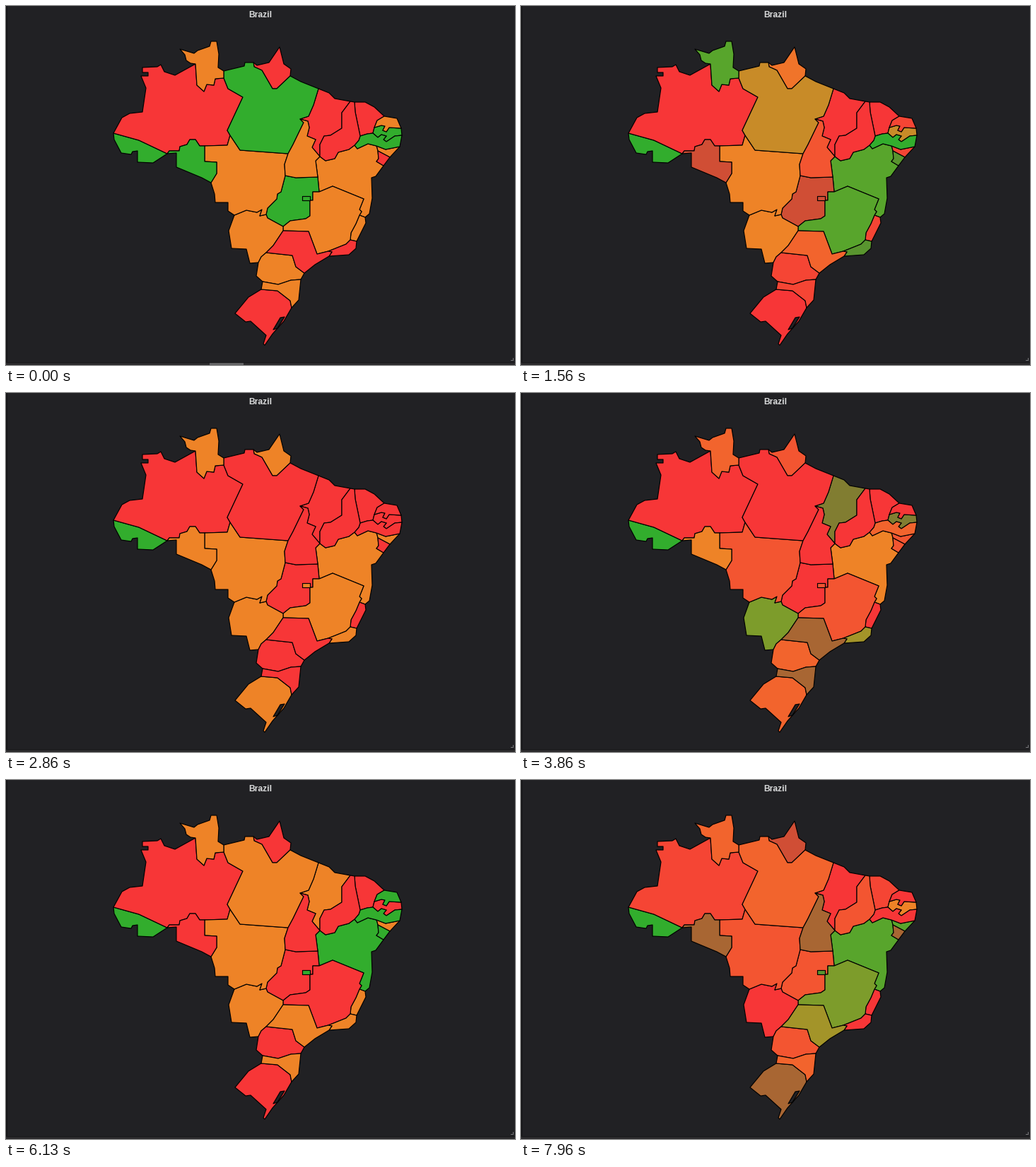
Recreate the animation shown at these times as a matplotlib script. Size 720 by 508 pixels, loop 8 s.

```python
import numpy as np
import matplotlib.pyplot as plt
from matplotlib.animation import FuncAnimation
from matplotlib.patches import Polygon, Rectangle

WIDTH, HEIGHT, DPI = 720, 508, 100
INTERVAL, LOOP = 20, 8000
BACKGROUND = "#212124"
RGB = {key: np.array(value) / 255 for key, value in
       dict(R=(247, 54, 55), O=(238, 131, 39), G=(50, 173, 45)).items()}
STEPS = 5  # colour steps per data refresh
HOVER_END = 560

# Each refresh recolours at a steady rate with one stall: start, pause, resume, end (ms)
REFRESHES = [
    (951, 1360, 1460, 1700), (2033, 2260, 2460, 2860), (3325, 3500, 3730, 4130),
    (4850, 5030, 5260, 5530), (6192, 6260, 6500, 6860), (7432, 7600, 7800, 8130),
]

# Colour of each state after every refresh; states repaint in this order
LEVELS = dict(
    AC="GGGGGGG", AL="OROROOG", AM="RRRRROR", AP="ROORRGR", BA="OGOOGOG", CE="RRRRROR",
    DF="GRORGRG", ES="ORRRORR", GO="GRRRROR", MA="RRRGORR", MG="OGORROG", MS="OOOGORR",
    MT="OOOROOR", PA="GORRORO", PB="GORGROO", PE="GGROGRR", PI="RRRRROR", PR="ORROROR",
    RJ="RGOGORR", RN="ORRRGRR", RO="GROORGR", RR="OGORORO", RS="RRORRGR", SC="ORRGORO",
    SE="RGROGGR", SP="RORGOGO", TO="ORRRRGR")

borders = []


def border(owners, *coords):
    """A line shared by two states, or the outer edge of one."""
    borders.append((owners.split(), list(zip(coords[::2], coords[1::2]))))


def outline(name):
    """Join all borders of a state end to end."""
    pieces = [points for owners, points in borders if name in owners]
    loop = list(pieces.pop(0))
    while pieces:
        piece = next(p for p in pieces if loop[-1] in (p[0], p[-1]))
        pieces.remove(piece)
        loop += piece[1:] if piece[0] == loop[-1] else piece[-2::-1]
    return loop


# North
border("AC", 152, 180, 153, 189, 163, 208, 177, 210, 179, 206, 186, 205, 186, 221,
       208, 222, 228, 209)
border("AC AM", 152, 180, 188, 190, 228, 209)
border("AM", 152, 180, 164, 158, 175, 152, 193, 150, 198, 116, 191, 99, 201, 99,
       201, 94, 193, 94, 193, 87, 214, 86, 219, 83, 224, 93, 239, 98, 268, 82)
border("AM RO", 228, 209, 231, 205, 245, 205, 246, 199, 256, 196, 260, 189, 268, 189,
       274, 198, 281, 198)
border("AM MT", 281, 198, 313, 197, 317, 183)
border("AM PA", 317, 183, 313, 176, 335, 129, 314, 117, 308, 102)
border("AM RR", 268, 82, 270, 112, 280, 121, 284, 111, 294, 112, 296, 103, 308, 102)
border("RR", 268, 82, 261, 81, 255, 77, 253, 69, 246, 61, 266, 67, 271, 63, 288, 57,
       290, 50, 298, 50, 301, 68, 300, 87, 308, 92)
border("RR PA", 308, 92, 308, 102)
border("PA", 308, 92, 337, 85, 338, 80, 350, 80)
border("AP PA", 350, 80, 351, 86, 362, 91, 377, 117, 383, 117, 402, 99)
border("AP", 350, 80, 355, 84, 372, 80, 387, 58, 393, 82, 403, 89, 402, 99)
border("PA", 402, 99, 417, 107, 442, 117)
border("PA MA", 442, 117, 435, 140, 428, 156, 416, 160)
border("PA TO", 416, 160, 421, 165, 406, 196, 399, 209)
border("PA MT", 399, 209, 331, 204, 317, 183)
border("RO", 228, 209, 241, 208, 241, 228, 277, 243, 290, 250)
border("RO MT", 281, 198, 281, 220, 298, 221, 298, 237, 290, 250)
border("MA TO", 416, 160, 427, 163, 429, 172, 426, 184, 438, 189, 433, 200, 444, 213)

# Northeast
border("MA", 442, 117, 457, 123, 465, 131, 487, 135)
border("MA PI", 487, 135, 478, 147, 475, 151, 475, 173, 459, 183, 450, 184, 444, 196,
       444, 213)
border("PI", 487, 135, 493, 136)
border("CE PI", 493, 136, 494, 150, 501, 184)
border("PE PI", 501, 184, 499, 190, 493, 197)
border("PI BA", 493, 197, 485, 203, 470, 207, 465, 216, 452, 219, 444, 213)
border("CE", 493, 136, 508, 136, 521, 143, 535, 156)
border("CE RN", 535, 156, 525, 162, 521, 172)
border("CE PB", 521, 172, 519, 180)
border("CE PE", 519, 180, 511, 181, 501, 184)
border("RN", 535, 156, 553, 159, 559, 173)
border("RN PB", 521, 172, 531, 169, 536, 170, 533, 176, 538, 178, 542, 172, 559, 173)
border("PB", 559, 173, 560, 183)
border("PB PE", 519, 180, 526, 186, 531, 182, 538, 184, 534, 189, 538, 192, 550, 184,
       560, 183)
border("PE", 560, 183, 557, 199)
border("PE AL", 524, 198, 537, 203, 557, 199)
border("PE BA", 493, 197, 497, 202, 512, 195, 524, 198)
border("AL", 557, 199, 543, 214)
border("AL SE", 526, 205, 543, 214)
border("AL BA", 524, 198, 526, 205)
border("SE", 543, 214, 534, 226)
border("SE BA", 526, 205, 527, 216, 524, 220, 534, 226)

# Centre
border("BA", 534, 226, 523, 241, 517, 243, 518, 272, 514, 294, 508, 299)
border("BA TO", 444, 213, 438, 219, 441, 242)
border("BA GO", 441, 242, 443, 263)
border("BA MG", 443, 263, 462, 255, 506, 273, 500, 288, 503, 291, 500, 296)
border("BA ES", 500, 296, 508, 299)
border("TO MT", 399, 209, 394, 224, 395, 240)
border("TO GO", 395, 240, 410, 243, 441, 242)
border("GO MT", 395, 240, 389, 263, 384, 266, 383, 273, 370, 286, 368, 295)
border("GO MS", 368, 295, 370, 300, 392, 312)
border("GO MG", 392, 312, 402, 304, 424, 301, 430, 297, 430, 275, 434, 275, 434, 263,
       443, 263)
border("MT", 290, 250, 295, 266, 296, 278, 314, 278, 314, 290, 323, 296)
border("MT MS", 323, 296, 340, 289, 355, 292, 362, 288, 359, 297, 368, 295)
border("MS", 323, 296, 315, 318, 319, 343, 340, 344, 345, 364, 357, 363)
border("MS PR", 357, 363, 361, 355, 368, 349)
border("MS SP", 368, 349, 378, 339, 392, 318)
border("MS MG", 392, 318, 392, 312)

# Southeast and south
border("MG SP", 392, 318, 428, 319, 440, 351, 456, 347)
border("MG RJ", 456, 347, 481, 337, 487, 331)
border("MG ES", 487, 331, 488, 321, 495, 308, 500, 296)
border("ES", 508, 299, 509, 307, 496, 333)
border("ES RJ", 487, 331, 496, 333)
border("RJ", 496, 333, 495, 343, 485, 352, 457, 354)
border("RJ SP", 456, 347, 461, 348, 457, 354)
border("SP", 457, 354, 437, 366, 422, 378)
border("SP PR", 422, 378, 410, 369, 405, 353, 368, 349)
border("PR", 422, 378, 417, 387)
border("PR SC", 417, 387, 403, 388, 385, 394, 363, 390)
border("PR", 357, 363, 354, 382, 363, 390)
border("SC", 417, 387, 414, 416, 404, 427)
border("SC RS", 361, 401, 384, 403, 402, 417, 404, 427)
border("SC", 363, 390, 361, 401)
border("RS", 404, 427, 393, 446, 377, 464, 366, 480, 364, 478, 368, 466, 346, 446,
       339, 447, 324, 435, 343, 412, 361, 401)

# Enclave
border("DF", 419, 269, 430, 269, 430, 275, 419, 275)

fig = plt.figure(figsize=(WIDTH / DPI, HEIGHT / DPI), dpi=DPI, facecolor=BACKGROUND)
ax = fig.add_axes([0, 0, 1, 1])
ax.set_xlim(0, WIDTH)
ax.set_ylim(HEIGHT, 0)
ax.axis("off")


def shape(points, color, zorder=2):
    return ax.add_patch(Polygon(points, facecolor=color, edgecolor="black",
                                linewidth=0.85, joinstyle="round", zorder=zorder))


def box(x, y, w, h, color):
    return ax.add_patch(Rectangle((x, y), w, h, facecolor=color, linewidth=0))


# Panel frame, scrollbar and resize corner
box(0, 0, 1.5, HEIGHT, "#151517")
box(0, 504, WIDTH, 1, "#18181a")
box(0, 505, WIDTH, 3, "#2b2a2c")
thumb = box(288, 505, 48, 3, "#626264")
box(714, 501, 4, 1, "#77777a")
box(717, 498, 1, 4, "#77777a")
ax.text(360.2, 16, "Brazil", color="#d8d9da", family="Liberation Sans", weight="bold",
        fontsize=12 * 72 / DPI, ha="center", va="baseline")

states = [(shape(outline(name), RGB[levels[0]], 3 if name == "DF" else 2), levels)
          for name, levels in LEVELS.items()]
# Lagoon in the south
shape([(378, 458), (388, 441), (394, 440), (384, 456)], BACKGROUND, 3)


def steps_done(time):
    """Colour steps completed over all refreshes up to this time."""
    total = 0
    for start, pause, resume, end in REFRESHES:
        before, after = pause - start, end - resume
        active = np.clip(time - start, 0, before) + np.clip(time - resume, 0, after)
        total += STEPS * active / (before + after)
    return total


def draw(frame):
    time = frame * INTERVAL
    thumb.set_visible(time < HOVER_END)
    refresh, within = divmod(steps_done(time), STEPS)
    refresh, done = int(refresh), int(within)
    reached = (within - done) * len(states)
    for index, (patch, levels) in enumerate(states):
        mix = (done + (index < reached)) / STEPS
        old, new = RGB[levels[refresh]], RGB[levels[refresh + 1]]
        patch.set_facecolor(old + (new - old) * mix)
    return [thumb] + [patch for patch, _ in states]


anim = FuncAnimation(fig, draw, frames=LOOP // INTERVAL, interval=INTERVAL,
                     repeat=True, repeat_delay=0, blit=False)
plt.show()
```
